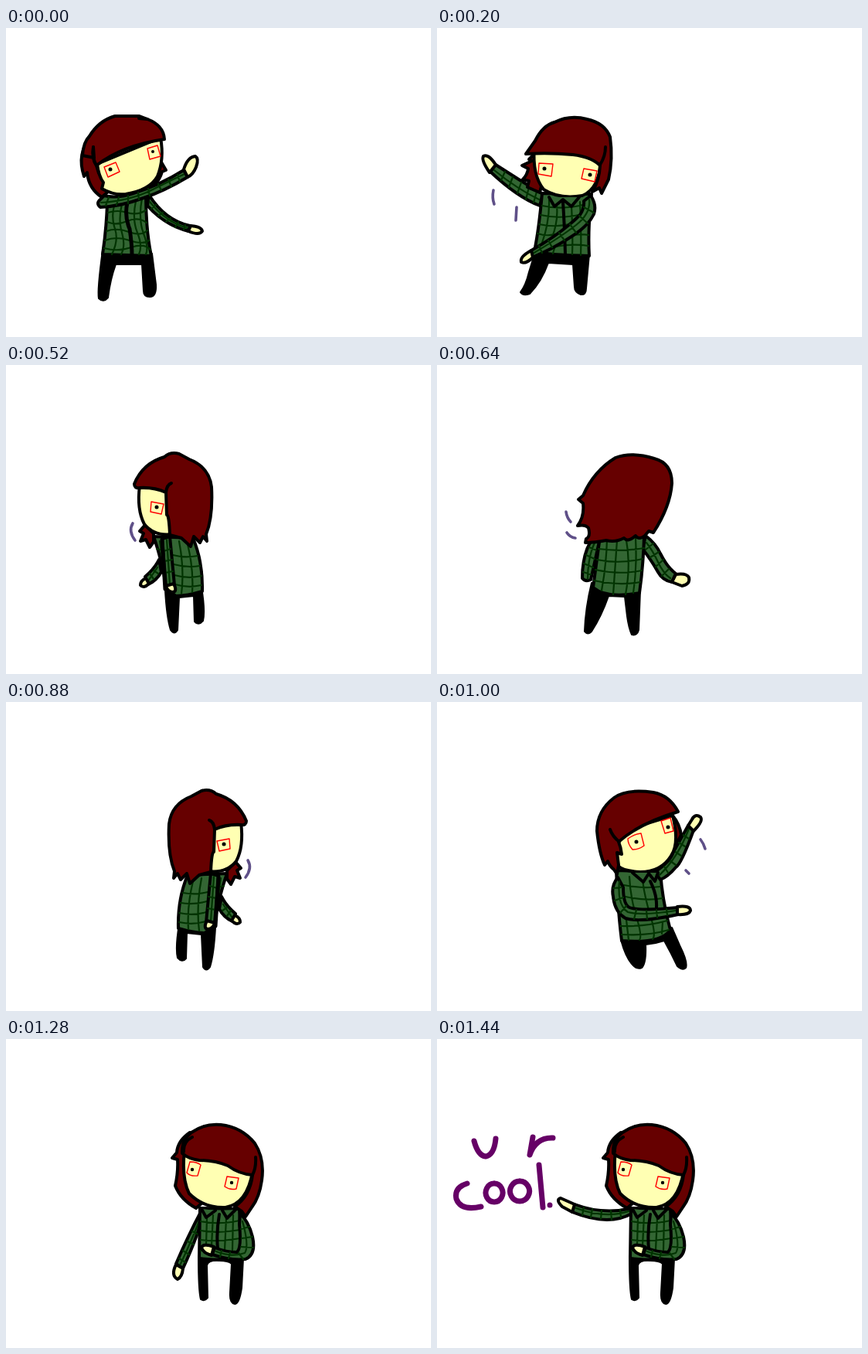
Animation of 550 by 400 pixels, one loop 2120 ms. Source, as an HTML page without scripts:

```html
<!DOCTYPE html>
<html lang="en">
<head>
<meta charset="utf-8">
<title>u r cool.</title>
<style>
html, body { margin: 0; width: 100%; height: 100%; overflow: hidden; background: #fff; }
svg { display: block; width: 100%; height: 100%; }
path { stroke: #000; stroke-width: 4; stroke-linecap: round; stroke-linejoin: round; fill: none; }
.hair { fill: #600; }
.skin { fill: #ffffb3; }
.shirt { fill: #363; }
.plaid { stroke: #030; stroke-width: 2.2; }
.pants { fill: #000; stroke-width: 2; }
.thick { stroke-width: 5; }
.specs { stroke: #f00; stroke-width: 1.4; }
.eye { stroke-width: 5; }
.whoosh { stroke: #5f5088; stroke-width: 3.6; }
.words { stroke: #606; stroke-width: 7; }

/* each pose is held for --hold, starting at --at */
.pose { visibility: hidden; animation: var(--hold) 2120ms step-end var(--at) infinite; }
@keyframes ms120 { 0% { visibility: visible } 5.661% { visibility: hidden } }
@keyframes ms160 { 0% { visibility: visible } 7.548% { visibility: hidden } }
@keyframes ms200 { 0% { visibility: visible } 9.434% { visibility: hidden } }
@keyframes ms680 { 0% { visibility: visible } 32.076% { visibility: hidden } }
</style>
</head>
<body>
<svg viewBox="0 0 550 400" role="img" aria-label="A turning figure who says: u r cool.">
<defs>
  <g id="lean">
    <path class="pants" d="M148 292L214 308Q208 330 200 339Q194 347 187 344Q181 338 182 314Q170 313 158 309Q149 325 141 342Q134 348 130 344Q127 337 138 315Z"/>
    <path class="shirt" d="M163 220Q160 260 150 295Q162 313 213 309Q218 270 220 218Z"/>
    <path class="plaid" d="M163 239Q185 242 210 237M160 254Q182 258 208 252M154 283Q182 291 215 290M152 295Q180 303 213 301M186 230Q184 250 176 276T173 307M203 226Q202 252 194 278T190 308M207 282L204 308M160 285L161 300"/>
    <path d="M176 232Q167 250 168 266"/>
    <path class="shirt" d="M120 166Q136 210 143 214Q153 226 163 230L170 220Q150 207 146 194L127 160Z"/>
    <path class="plaid" d="M126 164Q140 201 164 224M126 177L134 172M131 187L139 182M136 199L145 193M143 211L151 205M153 221L158 213"/>
    <path class="skin" d="M120 167Q107 154 111 149Q118 144 122 152L127 160Z"/>
    <path class="shirt" d="M218 227Q227 238 224 252Q222 272 208 280Q190 286 140 275L140 266Q190 271 203 266Q211 262 211 240Z"/>
    <path class="plaid" d="M216 232Q219 263 205 272Q185 277 143 270M155 268L154 276M168 269L167 279M181 270L180 281M194 269L197 281M207 264L215 273M211 253L222 257M213 240L224 241"/>
    <path class="skin" d="M141 265Q124 263 124 270Q126 276 141 275Z"/>
    <path class="hair" d="M147 147Q138 158 136 172L139 178L144 182Z"/>
    <path class="skin" d="M147 147Q138 183 149 199Q162 220 189 220Q211 219 218 212L222 170Z"/>
    <path class="hair" d="M140 142Q151 121 172 117Q207 112 223 124Q245 141 245 167Q242 196 235 211L231 206Q229 212 223 217L219 223L217 211L219 195L213 197Q214 188 217 181Q190 157 140 142Z"/>
    <path d="M216 181Q225 174 228 165"/>
    <path class="shirt" d="M166 221L170 232L178 222L185 233L199 221"/>
    <path class="specs" d="M150 150L162 154L157 170L146 167ZM188 170Q197 171 205 177Q205 184 199 191Q191 191 184 186Z"/>
    <path class="eye" d="M153 162h0M194 181h0"/>
    <path class="whoosh" d="M111 178Q107 183 105 190M130 218L126 222"/>
  </g>

  <g id="back">
    <path class="pants" d="M200 282L263 292L261 343Q259 351 252 349Q248 340 246 325L243 300L222 299Q213 325 200 345Q195 350 191 345Q192 315 200 282Z"/>
    <path class="shirt" d="M203 222Q188 242 188 276Q192 281 199 278L211 224Z"/>
    <path class="plaid" d="M204 230Q195 250 195 277M197 236L207 240M193 246L204 251M190 257L202 262M189 268L199 271"/>
    <path class="shirt" d="M270 221Q283 231 289 244Q298 262 309 270L304 281Q292 279 286 268Q277 252 266 238Z"/>
    <path class="plaid" d="M271 230Q279 240 286 255T302 276M270 239L280 231M276 249L287 242M283 261L293 252M291 273L300 264"/>
    <path class="skin" d="M309 271Q323 269 326 275Q328 284 317 286L304 281Z"/>
    <path class="shirt" d="M211 222L202 288Q220 303 262 295Q267 260 268 222Z"/>
    <path class="plaid" d="M209 238Q240 242 268 237M207 252Q235 258 266 251M205 265Q235 272 265 266M203 279Q235 286 263 281M220 226Q219 260 213 292M233 227L228 297M245 227Q251 260 244 297M257 224Q259 262 254 295"/>
    <path class="hair" d="M183 174L189 169Q203 137 231 120Q252 112 281 121Q304 127 304 153Q302 183 280 217L274 215L269 221Q261 227 257 221Q247 230 242 224Q231 230 219 227Q204 230 192 230L193 225Q199 222 196 211Q192 206 182 208Q191 196 189 179Z"/>
    <path class="whoosh" d="M167 190Q168 198 173 203M168 217Q172 223 179 224"/>
  </g>

  <g id="side">
    <path class="pants" d="M224 288L271 292Q269 327 264 343Q259 350 255 343L253 301L234 299L233 332Q228 338 222 331Q219 318 224 288Z"/>
    <path class="shirt" d="M279 252Q285 264 297 274L293 284Q282 279 276 268Z"/>
    <path class="plaid" d="M281 262L292 278M280 270L286 266M286 277L291 270"/>
    <path class="skin" d="M296 276Q303 279 303 285Q299 290 292 283Z"/>
    <path class="shirt" d="M235 224Q222 255 223 293Q243 299 257 299L269 290Q276 250 286 222Z"/>
    <path class="plaid" d="M229 247Q246 250 261 246M226 260Q242 263 260 258M224 273Q242 277 259 272M224 285Q242 289 258 284M242 232Q234 265 236 294M253 228Q246 265 250 296M278 228L274 256M274 240L282 238"/>
    <path class="shirt" d="M265 222L259 285L270 286L275 225Z"/>
    <path class="plaid" d="M269 226L265 284M264 238L273 241M262 252L272 254M261 267L271 269"/>
    <path class="thick" d="M275 226L271 290"/>
    <path class="skin" d="M260 283Q255 293 261 294Q268 294 270 286Z"/>
    <path class="hair" d="M286 218L297 207L304 215L299 218L303 228L296 226L291 236L286 229Z"/>
    <path class="skin" d="M268 162L304 156Q308 187 298 206Q285 222 262 219Z"/>
    <path class="hair" d="M253 115Q264 112 272 119Q300 127 311 154Q311 160 304 159Q285 158 270 165L269 194Q266 194 265 220L250 224L238 235L234 222L226 230L222 222L217 228L218 219Q209 197 211 158Q214 132 240 122Z"/>
    <path d="M263 153Q269 155 270 165"/>
    <path class="specs" d="M273 180L289 177L290 190L276 193Z"/>
    <path class="eye" d="M282 184h0"/>
    <path class="whoosh" d="M313 205Q319 215 310 227"/>
  </g>

  <g id="hang">
    <path class="shirt" d="M243 226Q225 260 210 295L219 301Q231 275 239 252Z"/>
    <path class="plaid" d="M241 237Q229 268 215 297M231 253L239 257M225 266L233 270M219 278L227 283M214 288L222 293"/>
    <path class="skin" d="M210 296Q203 310 212 315Q218 312 219 301Z"/>
  </g>

  <g id="front">
    <path class="pants" d="M249 281L307 284L305 322Q302 343 296 343Q289 342 290 328L292 291Q288 287 276 287Q262 286 260 293L261 335Q257 340 252 337Q249 325 249 281Z"/>
    <path class="shirt" d="M251 219L250 284Q275 287 305 285L302 220Z"/>
    <path class="plaid" d="M252 236Q275 241 302 235M252 248Q275 252 303 247M252 260Q275 263 303 258M252 274L262 275M260 232L259 266M268 228L266 268M285 232L283 273M294 228L293 273"/>
    <path d="M276 227Q272 250 274 272"/>
    <path class="shirt" d="M303 226Q314 236 319 256Q324 279 310 285Q290 287 267 279L270 270Q285 276 299 276Q305 270 302 240Z"/>
    <path class="plaid" d="M306 236Q315 268 309 277Q292 283 272 275M304 246L315 243M305 258L319 256M304 269L320 270M301 277L307 285M290 276L288 284M279 274L277 282"/>
    <path class="skin" d="M269 269Q255 264 253 270Q255 277 266 280Z"/>
    <path class="hair" d="M238 121Q222 132 221 147L215 154L222 156Q223 172 219 190Q226 208 246 219L262 205L240 150Z"/>
    <path class="skin" d="M231 145Q227 180 237 200Q256 219 284 218Q312 213 319 172L300 145Z"/>
    <path class="hair" d="M228 148Q227 130 240 121Q257 109 278 111Q305 114 322 135Q335 155 331 183Q328 205 318 218L310 230L305 223L296 217Q316 203 319 176Q302 175 287 164Q270 157 250 157Q236 155 228 148Z"/>
    <path d="M230 146Q229 133 241 127M323 153Q324 166 319 176"/>
    <path class="shirt" d="M253 220L259 231L271 222M280 222L286 232L297 221"/>
    <path class="specs" d="M238 159Q247 159 252 163L248 177Q238 178 234 173ZM286 178L301 180L298 194Q290 196 283 191Z"/>
    <path class="eye" d="M241 169h0M292 186h0" style="stroke-width:4.4"/>
  </g>
</defs>

<g class="pose" style="--hold:ms200;--at:0ms">
  <path class="pants" d="M125 288L189 292L194 332Q195 348 186 348Q178 348 178 340L176 306L142 306Q135 325 132 349Q126 356 120 350Q118 340 125 288Z"/>
  <path class="shirt" d="M185 216Q206 249 238 256L236 263Q205 255 183 230Z"/>
  <path class="plaid" d="M186 225Q208 252 235 259M188 234L194 229M197 243L203 239M207 251L213 246M219 258L223 251M230 261L232 255"/>
  <path class="skin" d="M239 256Q253 257 254 263Q250 269 236 263Z"/>
  <path class="shirt" d="M131 226Q130 260 125 293L188 295Q181 262 181 216Z"/>
  <path class="plaid" d="M132 239Q144 235 157 239T181 236M131 251Q143 256 157 250T182 252M130 263Q143 258 159 264T183 262M128 275Q143 269 160 275T185 275M127 285Q145 290 162 284T187 287M140 230Q136 245 141 260T137 293M150 228Q145 248 150 265T149 293M168 224Q163 248 170 265T172 293M176 220Q171 248 178 266T181 293"/>
  <path class="thick" d="M157 226Q153 244 160 260Q163 280 163 294"/>
  <path class="hair" d="M110 142Q91 162 101 192L105 187Q107 208 124 219L140 205L125 165Z"/>
  <path class="hair" d="M200 172L207 184L202 186Q199 197 190 206Z"/>
  <path class="skin" d="M118 176Q120 192 126 200L124 208Q140 217 155 215Q186 210 196 192Q205 170 200 142Z"/>
  <path class="hair" d="M113 154Q111 170 117 178Q150 152 205 144Q204 126 183 118L172 114L141 114Q120 120 108 140Q100 148 99 165L114 168Z"/>
  <path d="M113 154Q111 168 117 178L120 188M172 117L183 118"/>
  <path class="specs" d="M127 180L142 174L147 186L132 193ZM183 156L196 152L200 166L186 170Z"/>
  <path class="eye" d="M135 183h0"/><path d="M190 160h0"/>
  <path class="shirt" d="M127 217Q144 221 165 214Q200 203 230 184L235 193Q205 211 178 220Q148 231 122 232Q116 227 122 222Z"/>
  <path class="plaid" d="M123 226Q160 224 190 209T231 189M133 219L129 230M146 219L143 229M158 217L158 227M171 213L172 222M184 208L186 217M197 202L201 210M210 196L214 205M222 190L225 199"/>
  <path class="skin" d="M230 183Q235 167 245 166Q250 169 246 180Q242 190 235 193Z"/>
</g>

<g class="pose" style="--hold:ms160;--at:200ms">
  <path class="pants" d="M127 290L197 293L193 337Q193 346 186 345Q178 342 178 335L176 306Q160 305 144 304Q135 329 120 344Q111 347 108 342Q115 333 119 316Z"/>
  <path class="shirt" d="M76 177Q105 196 137 215L133 230Q104 219 69 186Z"/>
  <path class="plaid" d="M74 184Q103 208 134 223M83 197L88 186M93 206L98 193M104 214L109 200M115 222L119 206M125 226L129 212"/>
  <path class="skin" d="M68 187Q57 171 60 166Q66 162 76 177Z"/>
  <path class="shirt" d="M136 214Q132 260 126 289Q140 294 197 295Q195 260 200 215Z"/>
  <path class="plaid" d="M136 230Q163 236 193 228M134 242Q160 248 187 241M132 254Q155 259 175 253M130 266Q145 271 160 265M153 283Q176 279 196 282M170 269Q185 266 196 268M145 222Q146 250 136 278M155 230Q157 250 149 271M174 230Q176 270 175 293M185 225Q187 270 186 294M152 285L150 292"/>
  <path d="M163 225Q165 255 166 293"/>
  <path class="shirt" d="M199 217Q207 229 203 241Q196 256 174 270Q150 286 123 297L122 288Q161 266 185 242Q191 233 190 224Z"/>
  <path class="plaid" d="M197 222Q199 240 180 255T124 292M190 232L203 239M184 243L195 253M172 254L180 265M158 265L165 275M144 275L149 284M132 282L136 291"/>
  <path class="skin" d="M122 288Q107 296 109 303Q115 306 124 297Z"/>
  <path class="hair" d="M126 163L119 170L123 172L110 178L118 182Q117 190 111 196L119 198L117 206L133 213L140 185Z"/>
  <path class="skin" d="M126 155Q123 190 138 209Q158 222 188 217Q210 208 212 172L200 150Z"/>
  <path class="hair" d="M115 163L127 146Q137 126 152 122Q172 112 194 118Q217 123 224 141Q228 170 222 196L213 214L210 207L201 212Q210 198 211 178Q200 167 176 164Q145 161 115 163Z"/>
  <path d="M218 154Q218 166 211 177"/>
  <path class="shirt" d="M145 219L152 231L163 222L174 231L184 219"/>
  <path class="specs" d="M132 175L150 176L148 192L131 189ZM190 182L207 185L204 199L187 195Z"/>
  <path class="eye" d="M139 182h0M198 190h0"/>
  <path class="whoosh" d="M73 210Q71 220 74 228M103 232L102 249"/>
</g>

<use href="#lean" class="pose" style="--hold:ms160;--at:360ms"/>
<use href="#side" class="pose" style="--hold:ms120;--at:520ms" transform="matrix(-1 0 0 1 477 0)"/>
<use href="#back" class="pose" style="--hold:ms120;--at:640ms"/>
<use href="#back" class="pose" style="--hold:ms120;--at:760ms" transform="matrix(-1 0 0 1 500 0)"/>
<use href="#side" class="pose" style="--hold:ms120;--at:880ms"/>
<use href="#lean" class="pose" style="--hold:ms120;--at:1000ms" transform="matrix(-1 0 0 1 452 0)"/>

<g class="pose" style="--hold:ms160;--at:1120ms">
  <path class="pants" d="M237 286L291 288Q297 315 296 334Q292 340 286 334L279 297L261 297L260 342Q256 349 249 341Q239 325 237 286Z"/>
  <use href="#hang"/>
  <path class="shirt" d="M302 222Q317 255 309 294L299 292Q301 262 296 236Z"/>
  <path class="plaid" d="M302 232Q308 262 304 292M299 243L309 240M301 255L312 252M301 268L312 266M300 280L311 279"/>
  <path class="skin" d="M299 293Q299 306 304 306Q309 304 309 295Z"/>
  <path class="shirt" d="M244 222Q235 255 239 291Q265 295 291 292Q295 255 300 220Z"/>
  <path class="plaid" d="M242 240Q268 245 297 238M239 253Q265 257 295 251M238 265Q265 269 294 263M239 278Q265 281 292 276M251 234Q245 262 248 291M260 230Q253 262 258 291M277 232Q274 262 278 291M288 230Q282 262 286 291"/>
  <path d="M268 227Q260 260 267 291"/>
  <path class="hair" d="M229 147Q218 163 219 177L213 183L221 185Q217 196 223 206L226 215Q230 225 238 230L247 221L250 190Z"/>
  <path class="hair" d="M314 134L322 146L329 155L324 157Q323 172 327 180L320 184Q314 204 319 220L309 218L299 212L312 180Z"/>
  <path class="skin" d="M231 180Q234 203 241 212L248 219Q268 224 294 216Q316 195 316 164Z"/>
  <path class="hair" d="M231 181Q223 164 229 147Q246 118 266 117L288 117Q312 128 318 146Q320 158 315 166Q290 161 268 167Q248 181 231 181Z"/>
  <path d="M231 150Q226 165 231 181"/>
  <path class="shirt" d="M247 224L253 234L268 225L284 234L294 219"/>
  <path class="specs" d="M242 193L258 188L263 201L246 206ZM292 179L307 174L311 187L297 191Z"/>
  <path class="eye" d="M251 197h0M301 182h0"/>
</g>

<g class="pose" style="--hold:ms160;--at:1280ms">
  <use href="#hang" transform="translate(10 -4)"/>
  <use href="#front"/>
</g>

<g class="pose" style="--hold:ms680;--at:1440ms">
  <path class="shirt" d="M252 219Q215 228 178 214L175 224Q222 243 252 226Z"/>
  <path class="plaid" d="M180 219Q218 233 248 223M190 218L188 228M201 220L199 231M213 222L212 233M225 222L226 234M237 221L238 231"/>
  <path class="skin" d="M178 214L160 206Q153 208 162 217L175 224Z"/>
  <use href="#front"/>
  <path class="words" d="M48 132Q53 151 63 152Q74 150 76 129M124 127L120 150Q128 127 150 128M39 187Q22 192 25 207Q31 223 57 217M74 187a11 12 0 1 0 .1 0M107 184a12.500 13 0 1 0 .1 0M132 163L137 218M146 215h0"/>
</g>
</svg>
</body>
</html>
```
